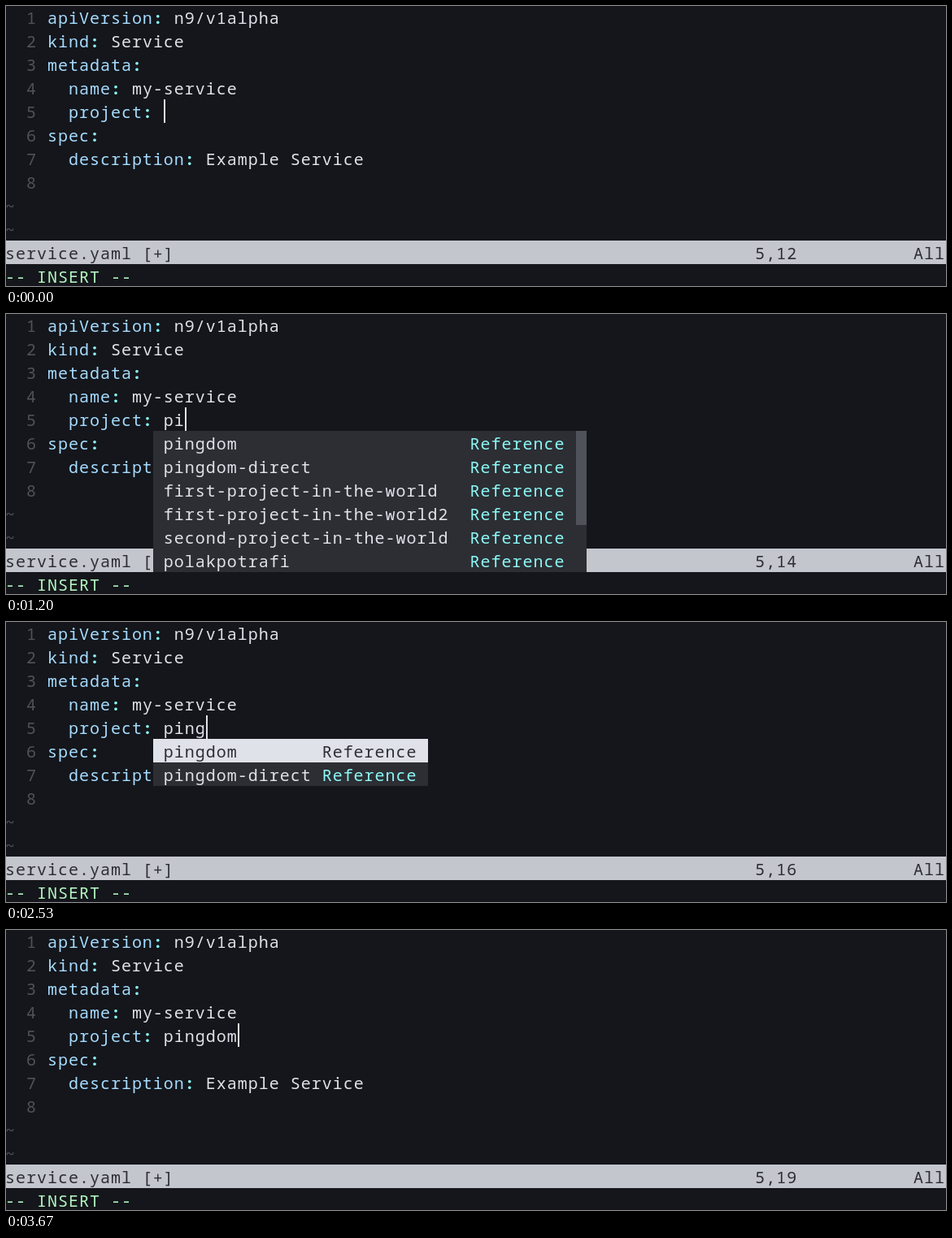
An HTML page that plays this animation: 1156x345 px, repeating every 5270 ms.

```html
<!DOCTYPE html>
<html lang="en">
<head>
<meta charset="utf-8">
<title>YAML completion in an editor</title>
<style>
  :root {
    --bg: #14161b; --fg: #e0e2ea; --panel: #2c2e33; --dim: #4f5258;
    --bar: #c4c6cd; --blue: #a6dbff; --cyan: #8cf8f7; --green: #b3f6c0;
  }
  html, body { margin: 0; width: 100%; height: 100%; overflow: hidden; background: var(--bg); }
  #stage {
    position: relative; width: 1156px; height: 345px; overflow: hidden;
    color: var(--fg); white-space: pre;
    font: 20px/29px "Noto Sans Mono", "DejaVu Sans Mono", monospace;
    letter-spacing: .989px; font-variant-ligatures: none;
  }
  #stage div { position: absolute; }
  .text { margin-left: -1px; }
  .fill.bar { background: var(--bar); }
  .fill.menu { background: var(--panel); }
  .fill.chosen, .fill.cursor { background: var(--fg); }
  .fill.thumb { background: var(--dim); }
  .dim { color: var(--dim); }
  .key { color: var(--blue); }
  .kind, .colon { color: var(--cyan); }
  .colon { font-weight: 600; }
  .mode { color: var(--green); }
  .dark { color: var(--panel); }
</style>
</head>
<body>
<div id="stage"></div>
<script>
const CELL = 1156 / 89, ROW = 29, LOOP = 5270;
const stage = document.getElementById("stage");

const span = (cls, text) => `<span class="${cls}">${text}</span>`;

const put = (row, col, html, cls = "") =>
  `<div class="text ${cls}" style="left:${col * CELL}px;top:${row * ROW}px">${html}</div>`;

// Backgrounds snap to whole pixels; the grid sits one pixel above the text rows.
function fill(cls, row, col, rows, endCol, width) {
  const x = Math.floor(col * CELL);
  const w = width || Math.floor(endCol * CELL) - x;
  return `<div class="fill ${cls}" style="left:${x}px;top:${row * ROW - 1}px;width:${w}px;height:${rows * ROW}px"></div>`;
}

const buffer = [
  ["apiVersion", "n9/v1alpha"], ["kind", "Service"], ["metadata", ""],
  ["  name", "my-service"], ["  project", ""], ["spec", ""],
  ["  description", "Example Service"], null
];

const menus = {
  p: {
    items: ["project", "pingdom", "project-1", "project-2", "poko-poko", "prometheus"],
    kindCol: 76, thumb: 1
  },
  pi: {
    items: ["pingdom", "pingdom-direct", "first-project-in-the-world",
            "first-project-in-the-world2", "second-project-in-the-world", "polakpotrafi"],
    kindCol: 44, thumb: 4
  },
  ping: { items: ["pingdom", "pingdom-direct"], kindCol: 30, thumb: 0 }
};

const scenes = [
  { at: 0, typed: "" },
  { at: 530, typed: "p" },
  { at: 600, typed: "p", menu: menus.p },
  { at: 1200, typed: "pi", menu: menus.pi },
  { at: 1600, typed: "pin", menu: menus.pi },
  { at: 1930, typed: "ping", menu: menus.ping },
  { at: 2530, typed: "ping", menu: menus.ping, chosen: 0 },
  { at: 2930, typed: "ping", menu: menus.ping, chosen: 1 },
  { at: 3200, typed: "ping", menu: menus.ping, chosen: 0 },
  { at: 3670, typed: "pingdom" }
];

function drawMenu({ items, kindCol, thumb }, chosen) {
  const end = kindCol + 10 + (thumb ? 1 : 0);
  let html = fill("menu", 5, 14, items.length, end);
  if (chosen !== undefined) html += fill("chosen", 5 + chosen, 14, 1, end);
  if (thumb) html += fill("thumb", 5, end - 1, thumb, end);
  items.forEach((name, i) => {
    const on = i === chosen;
    html += put(5 + i, 15, name, on ? "dark" : "");
    html += put(5 + i, kindCol, "Reference", on ? "dark" : "kind");
  });
  return html;
}

function drawScene({ typed, menu, chosen }) {
  let html = buffer.map((line, i) => {
    const number = span("dim", `  ${i + 1} `);
    if (!line) return put(i, 0, number);
    const value = i === 4 ? typed : line[1];
    return put(i, 0, number + span("key", line[0]) + span("colon", ":") + " " + value);
  }).join("");
  html += put(8, 0, "~", "dim") + put(9, 0, "~", "dim");
  html += fill("bar", 10, 0, 1, 89);
  html += put(10, 0, "service.yaml [+]", "dark");
  html += put(10, 71, `5,${12 + typed.length}`, "dark") + put(10, 86, "All", "dark");
  html += put(11, 0, "-- INSERT --", "mode");
  if (menu) html += drawMenu(menu, chosen);
  return html + fill("cursor", 4, 15 + typed.length, 1, 0, 2);
}

let shown;
function tick() {
  const time = performance.now() % LOOP;
  const scene = scenes.findLast(s => s.at <= time);
  if (scene !== shown) {
    stage.innerHTML = drawScene(scene);
    shown = scene;
  }
  requestAnimationFrame(tick);
}
tick();
</script>
</body>
</html>
```
